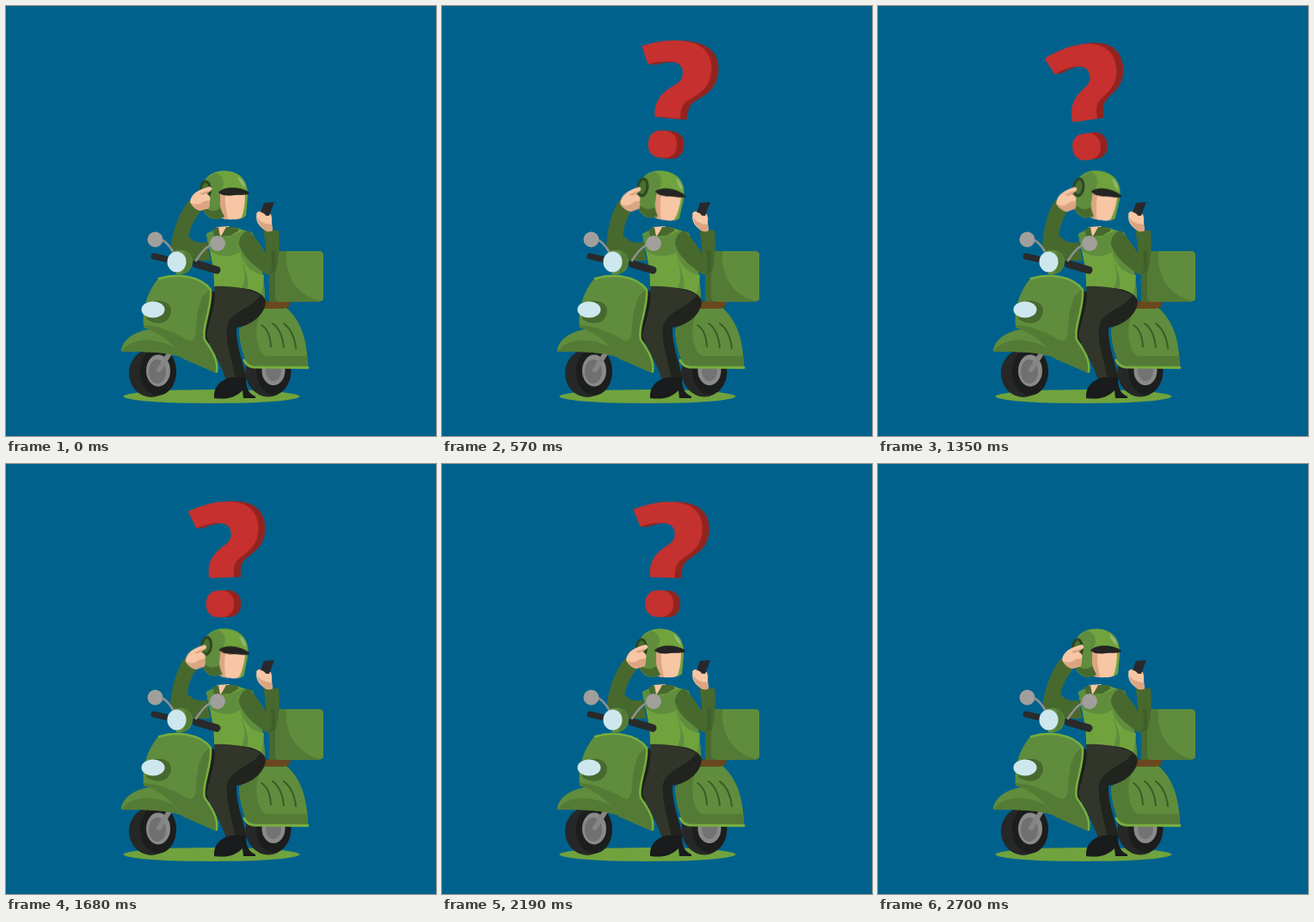
An HTML page for the animation above (3.03 s loop, 500x500 px).

```html
<!DOCTYPE html>
<html lang="en">
<head>
<meta charset="utf-8">
<title>Puzzled scooter rider</title>
<style>
  html, body { margin: 0; height: 100%; overflow: hidden; background: #00628c; }
  svg { display: block; width: 100vw; height: 100vh; }
  #swing, #pop { transform-origin: 255px 222px; }
  #pop { opacity: 0; }
  #head { transform-origin: 255px 222px; }
  #arm { transform-origin: 202px 283px; }
  .main { fill: #5f8d3d; }
  .mid { fill: #547b35; }
  .deep { fill: #48692e; }
  .lime { fill: #70a33d; }
  .skin { fill: #f7c6a4; }
  .blush { fill: #dca581; }
  .ink { fill: #262727; }
  .lamp { fill: #cde7ee; }
  .grey { fill: #a19f9c; }
  .line { fill: none; stroke-linecap: round; stroke-linejoin: round; }
</style>
</head>
<body>
<svg viewBox="0 0 500 500">
  <defs>
    <g id="mark">
      <path d="M217 54C235 46 252 43 268 44C288 46 299 58 298 77C297 94 288 101 278 108C270 113 267 119 268 132L239 132C237 113 245 104 256 96C264 91 267 86 266 79C265 70 257 68 248 68.500C240 69 232 71 226 74Z"/>
      <rect x="234.500" y="147" width="32.500" height="31" rx="14" ry="13.500"/>
    </g>
  </defs>

  <g id="swing"><g id="pop">
    <g fill="#93231f">
      <use href="#mark" x="8"/><use href="#mark" x="6"/>
      <use href="#mark" x="4"/><use href="#mark" x="2"/>
    </g>
    <use href="#mark" fill="#c6302e"/>
  </g></g>

  <ellipse class="lime" cx="239" cy="454" rx="102.500" ry="8"/>

  <!-- rear wheel, body and box -->
  <ellipse class="ink" cx="305" cy="425" rx="26.500" ry="29.500"/>
  <ellipse cx="311" cy="424" rx="20" ry="28" fill="#1c1d1d"/>
  <ellipse cx="311" cy="424" rx="13.500" ry="17" fill="#8a8a89"/>
  <ellipse cx="311" cy="424" rx="9" ry="12" fill="#737373"/>
  <path class="main" d="M283 420C277 410 272 396 271 376L300 351L326 351C341 364 350 384 351 419Z"/>
  <path class="mid" d="M283 420C277 410 272 396 271 376L296 354C287 380 292 400 302 407L349.500 407L351 420Z"/>
  <path class="line" d="M277 412Q280 419 288 420L351 420.500" stroke="#78ae40" stroke-width="3"/>
  <path class="line" d="M297 371Q307 377 308 396M310 369Q321 377 323 397M323 369Q335 378 337 398" stroke="#3d5a29" stroke-width="2"/>
  <path d="M302 343H329V351H302Z" fill="#3b4b28"/>
  <path d="M298 344H331Q330 351 322 352H298Z" fill="#69481f"/>
  <path class="deep" d="M306 285H316V344H306Z"/>
  <rect class="mid" x="313" y="285" width="56" height="59" rx="5"/>
  <path class="main" d="M326 285H364Q369 285 369 290V339Q369 343 365 343C345 338 324 322 326 285Z"/>

  <!-- front wheel -->
  <ellipse class="ink" cx="169" cy="427" rx="26" ry="28"/>
  <ellipse cx="177" cy="425" rx="21" ry="28" fill="#1c1d1d"/>
  <ellipse cx="177" cy="424" rx="14" ry="18.500" fill="#8a8a89"/>
  <ellipse cx="176" cy="425" rx="10" ry="14" fill="#707070"/>
  <path class="line" d="M190 404L178 423" stroke="#858585" stroke-width="6"/>

  <!-- torso -->
  <path class="lime" d="M233 265L247 258H268L286 264C292 285 300 310 301 341L242 328C243 306 237 286 233 265Z"/>
  <path class="main" d="M233 266L247 258C246 267 252 270 260 268L276 261L287 264C293 285 301 310 301 341L271 333C284 314 273 301 273 286C260 294 244 291 236 283Z"/>
  <path class="lime" d="M274 291C279 304 287 311 300 313L297 334L279 333C286 318 276 306 274 291Z"/>
  <path class="skin" d="M245 257L260 256L249 268Z"/>
  <path class="deep" d="M240 260L247 257L249 268L243 271ZM250 268L256 257H268L271 261L261 267Z"/>

  <!-- phone arm -->
  <path class="deep" d="M282 261C290 269 298 280 302 288C303 279 300 270 300 261H317C319 278 317 297 314 309C309 317 300 311 292 304C283 297 274 288 271 277C271 269 275 263 282 261Z"/>
  <path d="M307 284Q311 298 307 312L313 309V285Z" fill="#40602a"/>
  <path class="skin" d="M292 240Q296 237 302 241L308 242Q310 247 309 252L310 261Q305 264 300 260C294 256 289 249 292 240Z"/>
  <path class="blush" d="M292 246Q298 254 309 254L310 261Q305 264 300 260Q293 254 292 246Z"/>
  <path d="M300 229L312 228L306 244L295 243Z" fill="#29282c"/>
  <path class="skin" d="M291 241Q296 238 301 242L303 247L294 248Z"/>

  <!-- legs -->
  <path d="M240 330L260 352L250 392L231 392C227 376 234 352 240 330Z" fill="#1d1f1b"/>
  <path d="M260 328C282 326 301 333 302 344C301 359 286 371 268 374C267 394 276 414 280 434L261 438L240 390Z" fill="#21231e"/>
  <path d="M242 326C263 325 284 329 296 336C286 352 263 353 257 372C255 393 264 414 267 436L257 438C249 412 237 398 233 383C237 363 245 347 242 326Z" fill="#31352a"/>
  <path d="M242 456C241 443 249 435 261 432L279 432C279 443 281 450 290 454V456H276L275 447C267 455 258 458 242 456Z" fill="#191b1c"/>

  <!-- scratching arm -->
  <path class="deep" d="M203 269H213Q222 278 233 274L238 296H202Q190 290 193 277Z"/>
  <g id="arm">
    <path class="deep" d="M213 226L226 239C214 255 211 267 212 279L197 286Q190 281 193 271C197 252 204 237 213 226Z"/>
  </g>

  <!-- head -->
  <g id="head">
    <path class="skin" d="M249 218L278 217L278 242Q274 249 264 248Q254 249 249 245Z"/>
    <path class="blush" d="M249 219L255 220C254 232 257 240 258 248Q252 248 249 245Z"/>
    <path class="lime" d="M227 226C225 205 234 192 254 191.500C273 192 282 204 281 222L279 244L273 248C277 239 278 228 278 218L249 218C248 228 249 238 254 245L244 248Q229 246 227 226Z"/>
    <path class="main" d="M244 194C258 200 252 213 249 218C248 230 249 239 254 245L244 248Q229 246 227 226C225 209 231 199 244 194Z"/>
    <path class="deep" d="M228 232C235 239 243 240 249 235L254 245L244 248Q232 246 228 232ZM230 203Q239 207 238 218Q235 226 227 225Q226 212 230 203Z"/>
    <ellipse cx="232" cy="214" rx="5.500" ry="10" fill="#48702f" stroke="#2d4522" stroke-width="3"/>
    <path d="M269 198Q277 202 278 211Q272 207 269 198Z" fill="#92b878"/>
    <path d="M247 217C252 210 272 209 283 217C282 221 274 219 265 220Q253 222 247 217Z" fill="#232422"/>
  </g>

  <g id="hand">
    <path class="skin" d="M214 228C215 218 224 213 237 210Q241 212 238 215L233 218Q239 221 237 227L236 235L226 238Q218 236 214 228Z"/>
    <path class="blush" d="M215 229Q223 233 230 227L237 226L236 235L226 238Q218 236 215 229ZM225 218L238 214L233 218L228 220Z"/>
  </g>

  <!-- fender and leg shield -->
  <path class="main" d="M134 402C134 388 152 375 178 375L210 386V411C192 402 168 402 134 402Z"/>
  <path class="mid" d="M134 402C144 388 164 386 181 391C195 395 208 403 213 412C192 402 168 402 134 402Z"/>
  <path class="main" d="M177 317C198 311 226 313 238 330C240 351 227 374 231 388C239 400 247 411 245 427L206 410C195 392 176 378 160 374C158 354 163 334 177 317Z"/>
  <path class="mid" d="M160 371C182 372 199 382 214 390C226 387 216 365 229 337L237 330C240 351 227 374 231 388C239 400 247 411 245 427L206 410C195 392 176 378 160 374Z"/>
  <path class="line" d="M178 317C198 311 226 313 238 330C240 351 227 374 231 388C239 400 247 411 245 425" stroke="#78ae40" stroke-width="2.500"/>
  <path class="deep" d="M169 344C184 340 193 347 192 356C190 367 179 374 163 364Z"/>
  <ellipse class="lamp" cx="171" cy="353" rx="13.500" ry="9.500"/>

  <!-- handlebar -->
  <path class="line" d="M172 291L189 295" stroke="#292a2b" stroke-width="7"/>
  <path class="line" d="M221 300L245 307" stroke="#292a2b" stroke-width="9"/>
  <path class="line" d="M174 272Q184 268 195 287M246 276Q234 275 221 296" stroke="#8f918f" stroke-width="2.500"/>
  <circle class="grey" cx="173.500" cy="271.500" r="9"/>
  <circle class="grey" cx="246" cy="276" r="9"/>
  <path class="main" d="M195 285C207 281 217 286 217 298C216 308 209 313 198 312Z"/>
  <path class="mid" d="M207 284Q217 287 216 300Q214 309 205 311Q213 300 207 284Z"/>
  <ellipse class="lamp" cx="198.500" cy="297.500" rx="11" ry="12"/>
</svg>
<script>
  const LOOP = 3030;
  const SOFT = 'cubic-bezier(.37,0,.63,1)';
  const OUT = 'cubic-bezier(.2,.6,.4,1)';

  // steps: [time in ms, value, easing to the next step]
  function play(id, prop, format, steps) {
    const frames = steps.map(([time, value, easing = SOFT]) =>
      ({ offset: time / LOOP, [prop]: format(value), easing }));
    document.getElementById(id).animate(frames, { duration: LOOP, iterations: Infinity });
  }

  const turn = a => `rotate(${a}deg)`;
  const size = s => `scale(${s})`;
  const shift = k => `translate(${-7 * k}px, ${k}px) rotate(${-4 * k}deg)`;

  play('swing', 'transform', turn,
    [[0, 0], [480, 5.7], [1400, -8.2], [1960, 4.5], [2430, -1], [2700, 0], [LOOP, 0]]);
  play('pop', 'transform', size,
    [[0, 0, OUT], [390, 1.11], [660, 1], [2190, 1], [2700, 0], [LOOP, 0]]);
  play('pop', 'opacity', String,
    [[0, 0, 'linear'], [330, 1], [2190, 1, 'linear'], [2700, 0], [LOOP, 0]]);

  document.getElementById('hand').style.transformOrigin = '227px 225px';
  const pose = [[0, 0], [500, 1], [1450, 1], [2200, 0], [LOOP, 0]];
  play('head', 'transform', k => turn(8 * k), pose);
  play('arm', 'transform', k => turn(-6.5 * k), pose);
  play('hand', 'transform', shift, pose);
</script>
</body>
</html>
```
